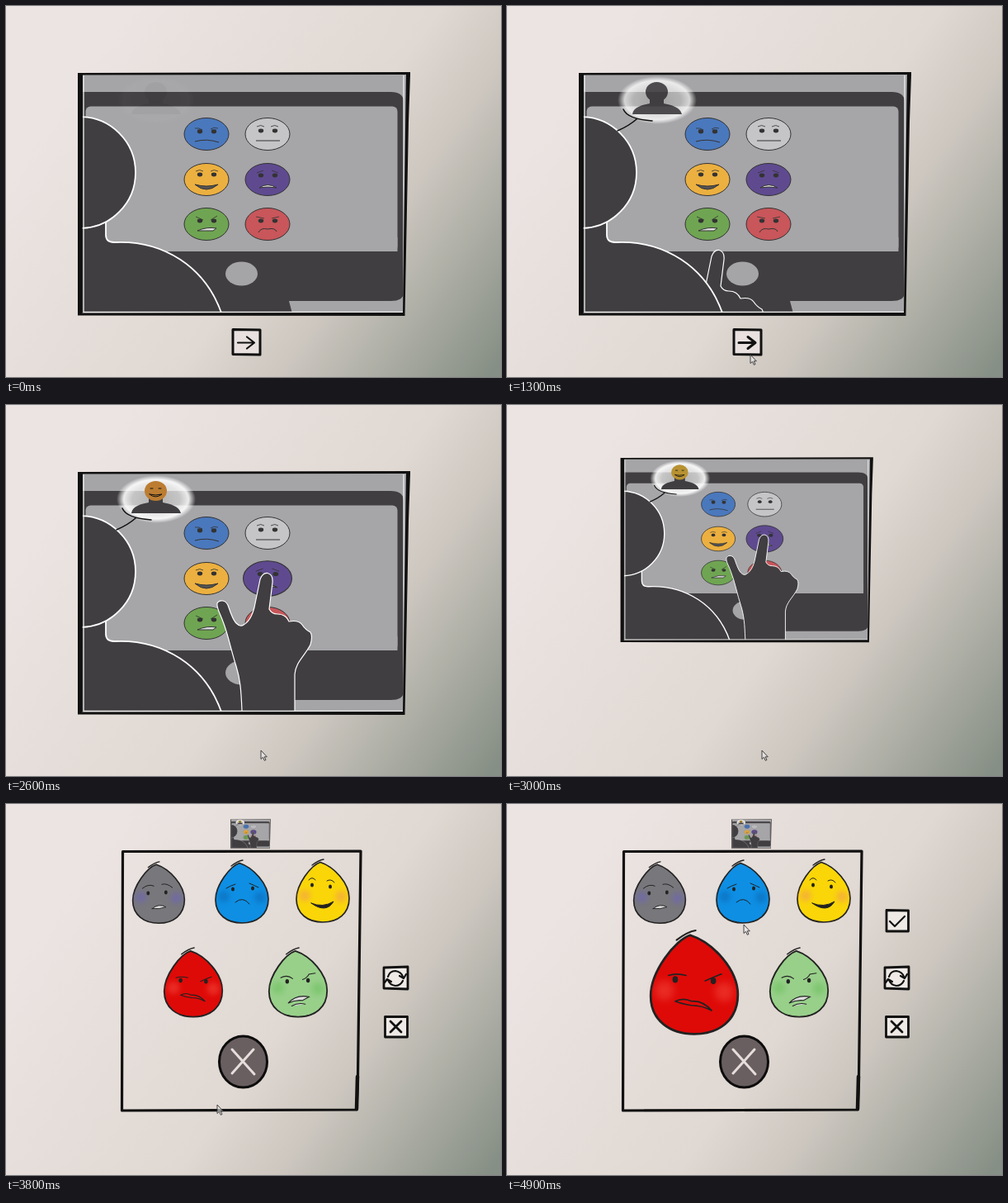
An HTML page that plays this animation: 600x449 px, repeating every 5 s.

```html
<!DOCTYPE html>
<html lang="en">
<head>
<meta charset="utf-8">
<title>Feelings storyboard</title>
<style>
  html, body { margin: 0; width: 100%; height: 100%; overflow: hidden; }
  svg { display: block; width: 100vw; height: 100vh; }
  .line { fill: none; stroke: #111; stroke-linecap: round; stroke-linejoin: round; }
  .cheeks { filter: blur(3px); opacity: .55; }
</style>
</head>
<body>
<svg viewBox="0 0 600 449" preserveAspectRatio="none">
  <defs>
    <linearGradient id="wall" gradientUnits="userSpaceOnUse" x1="120" y1="40" x2="620" y2="400">
      <stop stop-color="#ece4e2"/>
      <stop offset=".5" stop-color="#e0d8d2"/>
      <stop offset=".66" stop-color="#cdc7c0"/>
      <stop offset=".82" stop-color="#acada4"/>
      <stop offset="1" stop-color="#868f85"/>
    </linearGradient>
    <radialGradient id="glow">
      <stop stop-color="#fff" stop-opacity=".6"/>
      <stop offset=".6" stop-color="#fff" stop-opacity=".7"/>
      <stop offset=".82" stop-color="#fff" stop-opacity=".9"/>
      <stop offset="1" stop-color="#fff" stop-opacity="0"/>
    </radialGradient>
    <clipPath id="inside"><path d="M92 83H486L481 371H92Z"/></clipPath>
  </defs>
  <rect width="600" height="449" fill="url(#wall)"/>

  <g id="panel">
    <g clip-path="url(#inside)">
      <path fill="#a5a4a7" d="M88 80H490V374H88Z"/>
      <path fill="#403e40" d="M92 104H466Q482 104 482 116V347Q482 357 466 357H343L347 372H92Z"/>
      <rect x="96.500" y="121.500" width="378" height="175.500" rx="6" fill="#a6a5a8"/>
      <path fill="#a6a5a8" d="M460 280H474.500V297H460ZM96.500 280H120V297H96.500Z"/>
      <ellipse cx="285.500" cy="324" rx="19.500" ry="14.500" fill="#a5a4a7"/>
      <g id="faces"></g>
      <path id="hand" fill="#403e40" stroke="#fff" stroke-width="1.200" stroke-linejoin="round"
        d="M286 480V370C285 345 284 332 279 316C273 298 270 280 263 262C259 251 255 246 256 240Q258 236 263 237Q268 238 270 245Q275 260 279 264Q284 269 288 266Q297 261 301 245L308 211Q311 203 317 203.500Q324 205 323 215L319 247Q322 253 329 253Q339 253 343 262Q355 260 359 266Q363 272 369 275Q372 280 369 290C362 304 351 311 350 326V480Z"/>
      <g fill="#403e40" stroke="#fff" stroke-width="1.800">
        <path d="M90 372V250H121V277Q121 286 131 286C190 283 242 315 262 374Z"/>
        <circle cx="89.500" cy="201.500" r="67.500"/>
      </g>
      <path fill="none" stroke="#eee" stroke-width="1.300" d="M94 84V370.500H482V84"/>
      <g id="bubble">
        <ellipse cx="182" cy="114" rx="48" ry="29" fill="url(#glow)"/>
        <path fill="#403e40" d="M152 131C153 122 164 120 173 118V112H190V118C199 120 210 122 212 131Z"/>
        <ellipse id="head" cx="181.500" cy="104" rx="13.500" ry="12"/>
        <g id="smile" class="line" stroke-width="1">
          <path d="M175 101H178M185 101H188M174 108Q181 114 189 108Q181 110 174 108"/>
        </g>
      </g>
      <path id="tail" class="line" stroke-width="1.600" d="M134 151Q148 145 157 137M141 125Q146 137 176 139"/>
    </g>
    <path fill="#111" d="M87 81L490 80V83L488 140L483.500 375L87 374.500ZM93 83.500L92.500 371.500L481 371L482.500 250L485 83Z" fill-rule="evenodd"/>
  </g>

  <g id="next">
    <path class="line" stroke-width="3" style="fill:#e9e1df" d="M275 391.500L308 392V422L275 421.500Z"/>
    <path id="arrow" class="line" d="M281 407.500H300M292 400.500L301 407.500L292 414.500"/>
    <path id="thumb" fill="#0a0a0a" d="M290 395Q292 392 295 395Q297 399 296 402L302 402Q305 404 304 408L303 416Q302 419 298 419H288Q282 418 281 413Q280 406 284 404Q289 403 290 395Z"/>
  </g>

  <g id="choices">
    <path class="line" stroke-width="3.200" d="M141.500 57.500L430 57L426.500 330L425 370L140.500 371Z"/>
    <path class="line" stroke-width="4.500" d="M426 330L425 369"/>
    <g id="drops"></g>
    <ellipse cx="287.500" cy="312" rx="29" ry="31" fill="#6a5f60" stroke="#0c0c0c" stroke-width="3"/>
    <path class="line" style="stroke:#e5dedc" stroke-width="3" d="M274 297L301 327M300 297L274 326"/>
    <g class="line" stroke-width="2.800">
      <path style="fill:#efeae6" d="M458 198L487 197V224L458 223ZM459.500 257.500H486.500V282H459.500Z"/>
      <path stroke-width="2.200" d="M463 209Q465 202 472 202Q479 203 481 209M477 208L482 211L485 206M481 214Q478 220 472 220Q465 219 463 213M459 216L462 212L467 215"/>
      <path d="M466 263L479 276M479 263L466 276"/>
      <g id="check">
        <path style="fill:#efeae6" d="M460 128.500L486.500 129V154H460Z"/>
        <path stroke-width="2.200" d="M464 142L470 148L482 136"/>
      </g>
    </g>
  </g>
  <path id="cursor" fill="#eee" fill-opacity=".6" stroke="#333" stroke-width=".9" d="M0 0V10.500L2.500 8.300L4.300 12.300L6 11.500L4.200 7.800H7.300Z"/>
</svg>

<script>
const $ = id => document.getElementById(id);
const show = (id, opacity) => $(id).setAttribute('opacity', opacity);
const move = (id, x, y, s = 1) => $(id).setAttribute('transform', `translate(${x} ${y}) scale(${s})`);
const ramp = (t, a, b) => Math.min(1, Math.max(0, (t - a) / (b - a)));

// Interpolates rows of [time, ...values].
function track(t, keys) {
  let i = 1;
  while (i < keys.length - 1 && t > keys[i][0]) i++;
  const [a, b] = [keys[i - 1], keys[i]], u = ramp(t, a[0], b[0]);
  return a.slice(1).map((v, k) => v + (b[k + 1] - v) * u);
}

// Round faces on the tablet: position, colour, eye height, brows, mouth, mouth fill.
const faces = {
  sad: [243, 155, '#4a78bd', -3, 'M-14-7Q-9-8-5-5M5-6Q9-9 14-7M-11-5H-5M6-5H12', 'M-14 9Q0 5 15 10', 'none'],
  calm: [317, 155, '#c5c4c7', -4, 'M-13-9Q-8-12-4-9M4-9Q9-12 13-9', 'M-14 8H15', 'none'],
  happy: [243, 210, '#ecb040', -6, 'M-13-10Q-8-13-4-10M5-10Q9-13 14-10', 'M-14 6Q0 10 14 6Q0 18-14 6Z', '#555'],
  scared: [317, 210, '#5f4a90', -5, 'M-13-8L-5-11M5-11L13-8', 'M-10 10Q0 3 11 10Q0 8-10 10Z', '#ddd'],
  disgusted: [243, 264, '#6fa552', -4, 'M-13-9L-4-5M5-5L13-10', 'M-11 8Q0 3 12 5L8 8Q-2 8-11 8Z', '#ddd'],
  angry: [317, 264, '#c8565a', -4, 'M-14-9L-4-7M5-7L14-9', 'M-11 10Q-8 4 0 6Q9 4 11 9', 'none']
};
$('faces').innerHTML = Object.entries(faces).map(([name, [, , color, eye, brows, mouth, fill]]) => `
  <g id="${name}" stroke="#333" stroke-width="1">
    <ellipse rx="27" ry="19.500" fill="${color}"/>
    <path fill="none" stroke-width=".8" d="${brows}"/>
    <g fill="#333" stroke="none"><ellipse cx="-8" cy="${eye}" rx="3.200" ry="2.400"/><ellipse cx="9" cy="${eye}" rx="3.200" ry="2.400"/></g>
    <path fill="${fill}" d="${mouth}"/>
  </g>`).join('');

// Drops: position, scale, colour, cheek colour, eyes, brows, mouth, mouth fill.
const drops = {
  fear: [185, 109, .98, '#78777b', '#6a62c0', [-13, -1, 9, -2], 'M-20-7Q-13-13-6-10M4-12Q10-14 17-8', 'M-8 18Q0 11 9 16Q1 19-8 18Z', '#ddd'],
  sorrow: [286, 108, 1, '#0e8fe4', '#0d65b0', [-11, -5, 13, -6], 'M-19-6Q-14-9-8-11M9-12Q14-10 20-7', 'M-8 11Q1 3 9 13', 'none'],
  joy: [384, 107, 1, '#fad608', '#f09858', [-13, -9, 9, -7], 'M-17-15Q-13-20-9-15M5-14Q10-17 14-12', 'M-14 13Q0 19 13 11Q4 26-14 13Z', '#222'],
  rage: [227, 218, 1.1, '#de0a08', '#f4473c', [-14, -4, 14, -3], 'M-19-7Q-13-9-6-7M8-3Q12-5 20-8', 'M-14 12Q-8 9-2 12Q6 11 13 19Q6 15-2 15Q-9 14-14 12', 'none'],
  disgust: [354, 218, 1.1, '#98d08a', '#6cc05e', [-12, -3, 11, -4], 'M-19-7Q-12-11-6-6M5-5Q10-7 12-11L19-12', 'M-11 21Q-2 11 12 14L5 18Q-3 17-11 21ZM-7 24Q0 20 8 22', '#ddd']
};
$('drops').innerHTML = Object.entries(drops).map(([name, [, , , color, cheek, [a, b, c, d], brows, mouth, fill]]) => `
  <g id="${name}" stroke="#222" stroke-width="1.700" stroke-linecap="round">
    <path fill="${color}" d="M-3-36.500C-14-33-32-10-32 8C-32 26-18 36 0 36C18 36 32 26 32 7C32-11 14-31-3-36.500Z"/>
    <g class="cheeks" fill="${cheek}" stroke="none"><circle cx="-22" cy="4" r="7"/><circle cx="22" cy="5" r="7"/></g>
    <g fill="#222" stroke="none"><ellipse cx="${a}" cy="${b}" rx="2" ry="2.500"/><ellipse cx="${c}" cy="${d}" rx="2" ry="2.500"/></g>
    <path fill="none" stroke-width="1.300" d="M-13-33Q-5-39 1-40"/>
    <g stroke-width="1"><path fill="none" d="${brows}"/><path fill="${fill}" d="${mouth}"/></g>
  </g>`).join('');
for (const [name, [x, y, s]] of Object.entries(drops)) move(name, x, y, s);

const handPath = [[900, -110, 150], [1300, -60, 92], [1700, -13, 66], [1950, 8, 50], [2350, 16, 10], [2600, 0, 0]];
const cursorPath = [
  [500, 610, 455], [900, 420, 440], [1300, 295, 422], [1500, 299, 412], [1700, 300, 412], [2600, 309, 418],
  [3450, 309, 418], [3800, 256, 364], [4050, 238, 300], [4300, 226, 225], [4500, 228, 222], [4900, 287, 146]
];
const headColor = [[1800, 64, 62, 64], [2200, 180, 62, 60], [2600, 188, 125, 50], [3000, 184, 146, 50]];

function draw(now) {
  const t = Math.floor(now / 100) * 100 % 5000;

  show('bubble', ramp(t, -50, 1500));
  show('tail', ramp(t, 600, 1200));
  $('head').setAttribute('fill', `rgb(${track(t, headColor).map(Math.round)})`);
  show('smile', ramp(t, 2200, 2600));
  move('hand', ...track(t, handPath));
  for (const [name, [x, y]] of Object.entries(faces)) {
    const pressed = name === 'angry' && t >= 1600 && t < 2000 ? 1.04 : name === 'scared' && t >= 2400 ? 1.09 : 1;
    move(name, x, y, pressed);
  }

  // The picture shrinks into a thumbnail above the choices.
  const u = ramp(t, 2850, 3400), s = 1 - .88 * u;
  move('panel', 288.5 + 8 * u - 288.5 * s, 227.5 - 191.5 * u - 227.5 * s, s);

  const liked = t >= 1500;
  show('next', t < 2100 ? 1 : 0);
  show('arrow', liked ? 0 : 1);
  show('thumb', liked ? 1 : 0);
  $('arrow').setAttribute('stroke-width', t >= 1300 ? 3 : 2.2);

  show('choices', ramp(t, 3450, 3700));
  const [x, y, small] = drops.rage, grow = ramp(t, 4200, 4500);
  move('rage', x, y + grow, small + .55 * grow);
  show('check', t >= 4400 ? 1 : 0);

  move('cursor', ...track(t, cursorPath));
  requestAnimationFrame(() => draw(performance.now() - start));
}
const start = performance.now();
draw(0);
</script>
</body>
</html>
```
